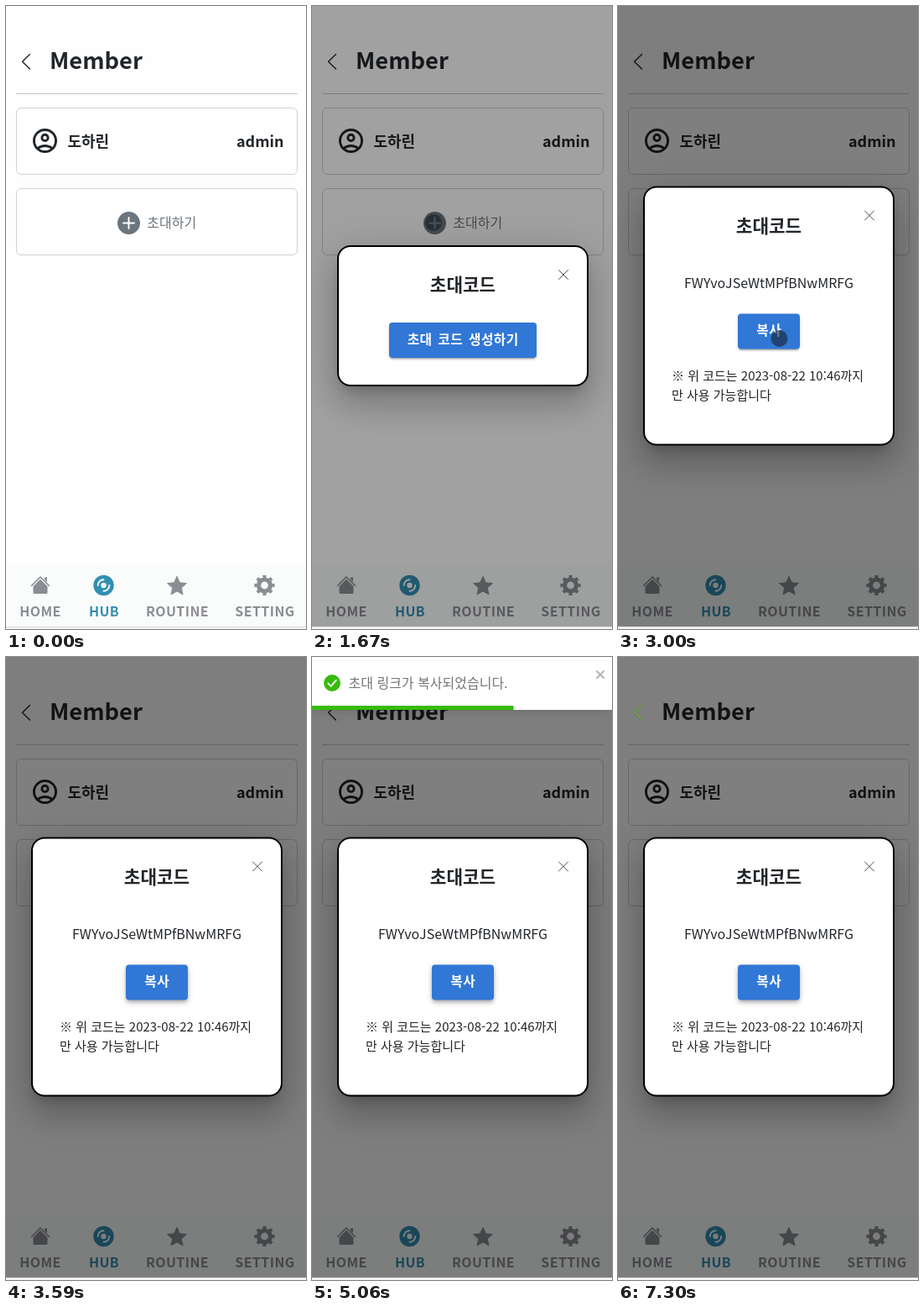
Write an HTML page that moves like this. It is 358 px wide and 742 px high and loops after 7.83 s.

```html
<!DOCTYPE html>
<html lang="ko">
<head>
<meta charset="utf-8">
<title>Member</title>
<style>
  html, body { margin: 0; width: 100%; height: 100%; overflow: hidden; background: #fff; }
  #stage {
    position: relative; width: 358px; height: 742px; overflow: hidden; background: #fefefe;
    font-family: "Noto Sans CJK KR", "Noto Sans KR", "Noto Sans CJK JP", "Noto Sans", sans-serif;
    --loop: 7.83s linear infinite;
  }
  #stage div, svg { position: absolute; box-sizing: border-box; }
  svg, .layer { left: 0; top: 0; width: 358px; height: 742px; }
  text { fill: #212529; font-size: 16px; }
  .line { fill: none; stroke-linecap: round; stroke-linejoin: round; }
  .mid { text-anchor: middle; }
  .bold { font-weight: 600; }
  .title { font-size: 21.3px; font-weight: 700; }
  .nav text { font-weight: 600; letter-spacing: .4px; fill: #8b8d93; }
  .nav .on { fill: #318fb2; }
  .label { fill: #fff; font-size: 15.8px; font-weight: 600; letter-spacing: .4px; word-spacing: 2px; }
  .note { font-size: 15px; }
  .close { stroke: #4a4d50; stroke-width: 1; }

  #shade { left: 0; top: 0; width: 358px; height: 739px; background: #000; animation: shade var(--loop); }
  .card {
    left: 30px; width: 300px; background: #fff; border: 2px solid #000; border-radius: 16px;
    box-shadow: 0 11px 15px -7px #0003, 0 24px 38px 3px #00000024, 0 9px 46px 8px #0000001f;
  }
  .btn {
    height: 42px; border-radius: 4px; background: #3177d6;
    box-shadow: 0 3px 1px -2px #0003, 0 2px 2px #00000024, 0 1px 5px #0000001f;
  }
  #ask { animation: ask var(--loop); }
  #code { transform: translateY(.5px); animation: code var(--loop); animation-timing-function: step-end; }
  #code .btn { animation: lift var(--loop); }

  #pointer { animation: move var(--loop); }
  #pointer circle { animation: press var(--loop); animation-timing-function: step-end; }
  #tint { animation: tint var(--loop); animation-timing-function: step-end; }

  #toast {
    left: 0; top: 0; width: 358px; height: 63px; background: #fff;
    box-shadow: 0 1px 10px #0000001a, 0 2px 15px #0000000d; animation: toast var(--loop);
  }
  #bar { left: 0; bottom: 0; width: 358px; height: 5px; background: #36bb0b; transform-origin: 0 0; animation: bar var(--loop); }

  @keyframes shade { 0%, 20.307% { opacity: 0 } 21.711%, 100% { opacity: .5 } }
  @keyframes ask {
    0%, 20.434% { opacity: 0 }
    20.945%, 31.418% { opacity: 1 }
    31.419%, 100% { opacity: 0 }
  }
  @keyframes code { 0% { opacity: 0 } 31.418%, 100% { opacity: 1 } }
  @keyframes lift {
    0%, 42.1% { box-shadow: 0 3px 1px -2px #0003, 0 2px 2px #00000024, 0 1px 5px #0000001f }
    45.3%, 100% { box-shadow: 0 2px 4px -1px #0003, 0 4px 5px #00000024, 0 1px 10px #0000001f }
  }
  @keyframes move {
    0%, 5.109% { transform: translate(285px, 667px) }
    5.964% { transform: translate(244px, 526px) }
    6.807% { transform: translate(203px, 438px) }
    7.663% { transform: translate(176px, 380px) }
    8.519% { transform: translate(152px, 330px) }
    9.387% { transform: translate(146px, 288px) }
    11.111% { transform: translate(145px, 258px) }
    22.158% { transform: translate(145px, 258px); animation-timing-function: cubic-bezier(.2, .55, .5, 1) }
    26.437%, 100% { transform: translate(192.5px, 396px) }
  }
  @keyframes press {
    0% { opacity: 0; fill: #14202c; r: 10px }
    5.108%, 20.945%, 31.418%, 42.018% { opacity: .6; fill: #14202c; r: 10px }
    18.774%, 29.757%, 39.974% { opacity: .73; fill: #abaa00; r: 12px }
    44.7%, 100% { opacity: 0; fill: #14202c; r: 10px }
  }
  @keyframes toast {
    0% { transform: translateX(3000px); opacity: 0 }
    43.295% { transform: translateX(3000px); opacity: 0; animation-timing-function: cubic-bezier(.215, .61, .355, 1) }
    48.659% { transform: translateX(-25px); opacity: 1; animation-timing-function: cubic-bezier(.215, .61, .355, 1) }
    50% { transform: translateX(10px); animation-timing-function: cubic-bezier(.215, .61, .355, 1) }
    51.341% { transform: translateX(-5px); animation-timing-function: cubic-bezier(.215, .61, .355, 1) }
    52.235% { transform: none }
    90.166% { transform: none; animation-timing-function: ease }
    91.954% { transform: translateX(-20px); opacity: 1; animation-timing-function: ease }
    99.106%, 100% { transform: translateX(2000px); opacity: 0 }
  }
  @keyframes bar { 0%, 52.235% { transform: scaleX(1) } 90.038%, 100% { transform: scaleX(0) } }
  @keyframes tint { 0% { opacity: 0 } 93.23%, 100% { opacity: 1 } }
</style>
</head>
<body>
<div id="stage">
  <svg viewBox="0 0 358 742">
    <path class="line" d="M28.5 57.5l-9 8.7 9 8.7" stroke="#212529" stroke-width="1.4"/>
    <text class="bold" x="52" y="75" style="font-size:27.3px">Member</text>
    <path d="M12 104.5H348" stroke="#c5c7c9"/>
    <g fill="#fff" stroke="#cfd1d4">
      <rect x="12.5" y="121.5" width="335" height="79" rx="5.5"/>
      <rect x="12.5" y="217.5" width="335" height="79" rx="5.5"/>
    </g>
    <g transform="translate(29.1 143.1) scale(1.45)" fill="none" stroke="#212529" stroke-width="2">
      <circle cx="12" cy="12" r="9"/>
      <circle cx="12" cy="9.5" r="2.5"/>
      <path d="M5.9 18.4a9.2 9.2 0 0 1 12.2 0"/>
    </g>
    <text class="bold" x="73.5" y="167.5" style="font-size:18px">도하린</text>
    <text class="bold" x="331.5" y="167.5" text-anchor="end" style="font-size:18px">admin</text>
    <circle cx="146.5" cy="258.5" r="13.5" fill="#6c757d"/>
    <path class="line" d="M140 258.5h13M146.5 252v13" stroke="#fff" stroke-width="1.9"/>
    <text x="168.3" y="263.5" style="fill:#6c757d">초대하기</text>

    <rect y="664" width="358" height="75" fill="#fafbfb"/>
    <rect y="739" width="358" height="1" fill="#d9dadb"/>
    <rect y="740" width="358" height="2" fill="#f6f6f6"/>
    <g class="nav" fill="#8b8d93">
      <path class="line" d="M30.5 690.5L41 680l10.5 10.5" stroke="#8b8d93" stroke-width="1.6"/>
      <path d="M41 682.8l8.5 8.5v7.2q0 1.5-1.5 1.5H34q-1.5 0-1.5-1.5v-7.2zM46 680.5h3v5.6l-3-3z"/>
      <circle cx="116.5" cy="690" r="12.2" class="on"/>
      <circle cx="116.5" cy="690" r="3.2" fill="#fafbfb"/>
      <path class="line" d="M109.7 690a6.8 6.8 0 0 1 6.8-6.8M123.3 690a6.8 6.8 0 0 1-6.8 6.8" stroke="#fafbfb" stroke-width="1.9"/>
      <path transform="translate(204 691.3)" stroke="#8b8d93" stroke-linejoin="round"
        d="M0-12L3.3-4.5 11.4-3.7 5.3 1.7 7.05 9.7 0 5.6-7.05 9.7-5.3 1.7-11.4-3.7-3.3-4.5z"/>
      <g fill="none" stroke="#8b8d93">
        <circle cx="308.5" cy="690" r="7" stroke-width="5.2"/>
        <circle cx="308.5" cy="690" r="10.3" stroke-width="3.6" pathLength="16" stroke-dasharray="1 1" stroke-dashoffset=".5"/>
      </g>
      <g class="mid">
        <text x="41" y="727">HOME</text>
        <text x="117" y="727" class="on">HUB</text>
        <text x="204.5" y="727">ROUTINE</text>
        <text x="309" y="727">SETTING</text>
      </g>
    </g>
  </svg>

  <div id="shade"></div>

  <svg id="tint" viewBox="0 0 358 742">
    <path class="line" d="M28.5 57.5l-9 8.7 9 8.7" stroke="#72ab42" stroke-width="1.6"/>
  </svg>

  <div id="ask" class="layer">
    <div class="card" style="top:285px;height:168px"></div>
    <div class="btn" style="left:92px;top:377px;width:176px"></div>
    <svg viewBox="0 0 358 742">
      <text class="title mid" x="180" y="340">초대코드</text>
      <path class="line close" d="M294.5 314.5l11 11m0-11l-11 11"/>
      <text class="label mid" x="180.2" y="402.5">초대 코드 생성하기</text>
    </svg>
  </div>

  <div id="code" class="layer">
    <div class="card" style="top:214px;height:309px"></div>
    <div class="btn" style="left:143px;top:366px;width:74px"></div>
    <svg viewBox="0 0 358 742">
      <text class="title mid" x="180" y="269">초대코드</text>
      <path class="line close" d="M294.5 243.5l11 11m0-11l-11 11"/>
      <text class="mid" x="180" y="335">FWYvoJSeWtMPfBNwMRFG</text>
      <text class="label mid" x="180.2" y="391.5">복사</text>
      <text class="note" x="64" y="445">※ 위 코드는 2023-08-22 10:46까지</text>
      <text class="note" x="64" y="468">만 사용 가능합니다</text>
    </svg>
  </div>

  <svg viewBox="0 0 358 742">
    <g id="pointer"><circle r="10"/></g>
  </svg>

  <div id="toast">
    <svg viewBox="0 0 358 742">
      <circle cx="24" cy="31" r="10" fill="#36bb0b"/>
      <path class="line" d="M19.3 31.4l3.3 3.4 6.2-7.2" stroke="#fff" stroke-width="1.8"/>
      <text x="43.5" y="37" style="fill:#757575">초대 링크가 복사되었습니다.</text>
      <path class="line" d="M340 17l8 8m0-8l-8 8" stroke="#b3b3b3" stroke-width="2"/>
    </svg>
    <div id="bar"></div>
  </div>
</div>
</body>
</html>
```
